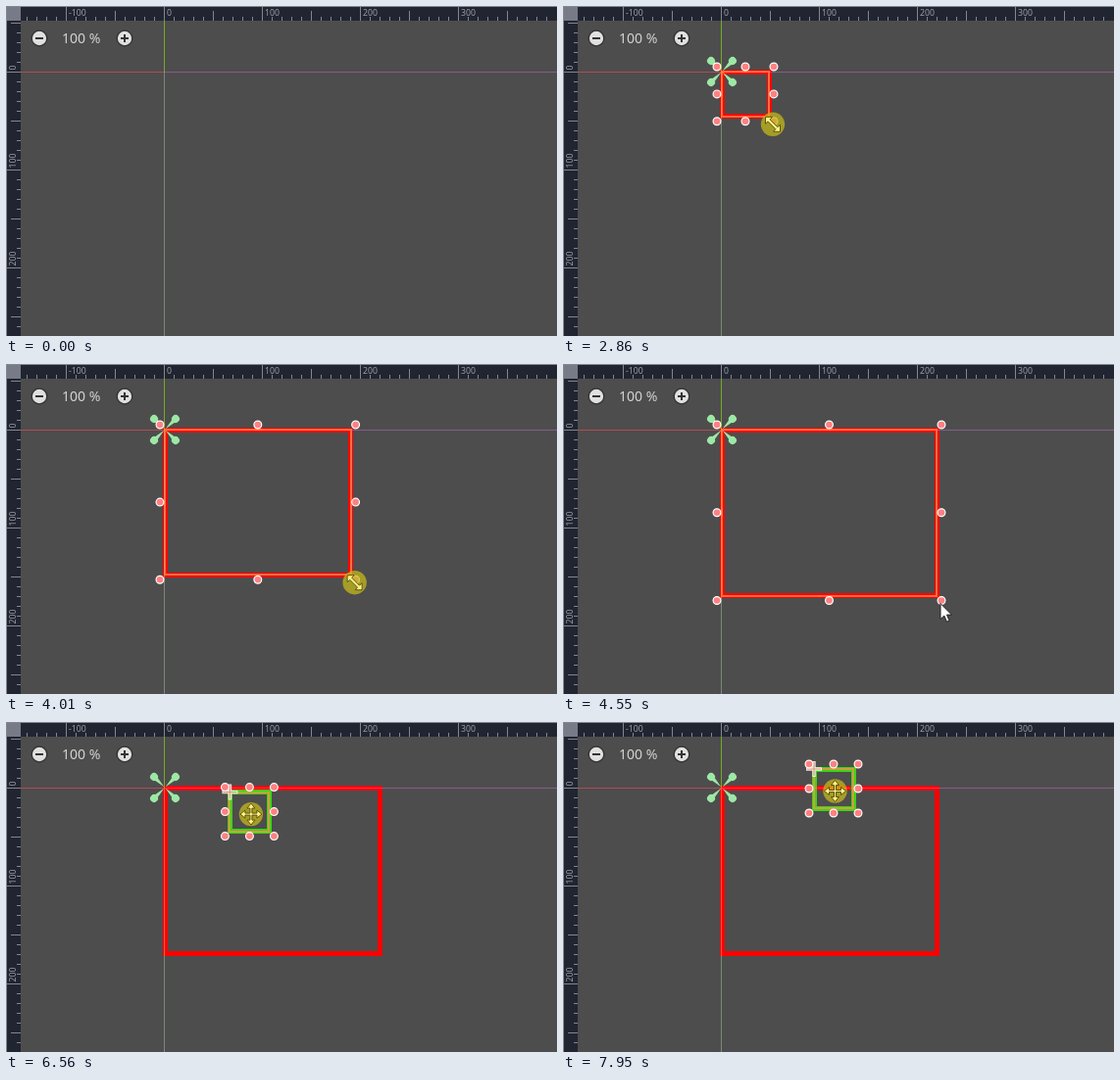
Recreate the animation shown at these times as an HTML page. Size 562 by 337 pixels, loop 8 s.

```html
<!DOCTYPE html>
<html lang="en">
<head>
<meta charset="utf-8">
<title>Canvas editor: resize and move</title>
<style>
  html, body { margin: 0; width: 100%; height: 100%; overflow: hidden; background: #4d4d4d; }
  svg { display: block; width: 562px; height: 337px; }
  text { font-family: "Noto Sans", "Open Sans", sans-serif; }
  .label { font-size: 8.7px; fill: #9a9da6; }
  .tick { stroke: #83868f; fill: none; shape-rendering: crispEdges; }
  .handle { fill: #ff8080; stroke: #fff; stroke-width: 1.2; }
  .edge { fill: none; stroke-width: 5; shape-rendering: crispEdges; }
</style>
</head>
<body>
<svg viewBox="0 0 562 337">
  <rect width="562" height="337" fill="#4d4d4d"/>
  <rect id="red" class="edge" stroke="#f00"/>
  <rect id="green" class="edge" stroke="#3ad614"/>
  <g id="axes">
    <path d="M161.5 15V67" stroke="#7dbb1c" stroke-opacity=".85"/>
    <path d="M161.5 67V337" stroke="#d4ffc4" stroke-opacity=".34"/>
    <path d="M15 67.5H161" stroke="#d94a55" stroke-opacity=".75"/>
    <path d="M161 67.5H562" stroke="#e070e0" stroke-opacity=".4"/>
  </g>
  <rect id="outline" class="edge" stroke="#ff8c52" stroke-opacity=".75" style="stroke-width:2"/>
  <g id="anchors" fill="#9de8a5" transform="translate(162 67)"></g>
  <g id="pivot">
    <path d="M0-8V8M-8 0H8" stroke="#fff" stroke-width="3.4" stroke-opacity=".85"/>
    <path d="M0-7V7M-7 0H7" stroke="#e58f80" stroke-width="1.2"/>
  </g>
  <g id="handles"></g>
  <g id="cursor">
    <circle id="press" r="12.2" fill="#c4b91a" fill-opacity=".74"/>
    <g id="shapes" stroke-linejoin="round">
      <path id="arrow" d="M0 0V16L3.8 12.6L6.5 18.8L9.1 17.6L6.5 11.6H11.5Z"/>
      <path id="resize" d="M-7.5-7.5H-.5L-2.9-4.9L4.9 2.9L7.5.5V7.5H.5L2.9 4.9L-4.9-2.9L-7.5-.5Z"/>
      <path id="move" d="M-1-1V-6H-4L0-11L4-6H1V-1H6V-4L11 0L6 4V1H1V6H4L0 11L-4 6H-1V1H-6V4L-11 0L-6-4V-1Z"/>
    </g>
  </g>
  <g id="rulers">
    <path d="M0 0H562V15H15V337H0Z" fill="#202531"/>
    <rect width="15" height="15" fill="#777a87"/>
    <path class="tick" d="M0 .5H562M.5 0V337"/>
  </g>
  <g id="zoom">
    <text x="57" y="38" font-size="14" fill="#d2d2d2">100 %</text>
  </g>
</svg>
<script>
const $ = id => document.getElementById(id);
const LOOP = 8000, TICK = 1000 / 13, ORIGIN = { x: 162, y: 67 };

function add(parent, tag, attrs, text) {
  const el = document.createElementNS("http://www.w3.org/2000/svg", tag);
  set(el, attrs);
  if (text !== undefined) el.textContent = text;
  parent.append(el);
  return el;
}
function set(el, attrs) {
  for (const key in attrs) el.setAttribute(key, attrs[key]);
}
const place = (el, [x, y]) => set(el, { transform: `translate(${x} ${y})` });
const show = (el, on) => { el.style.display = on ? "" : "none"; };

function buildRulers() {
  const rulers = $("rulers");
  const start = n => n % 100 === 0 ? 0 : n % 50 === 0 ? 5 : 11;
  let ticks = "";
  const label = (n, transform) => {
    if (n % 100 === 0) add(rulers, "text", { class: "label", transform }, n);
  };
  for (let n = -140; n < 400; n += 10) {
    const x = ORIGIN.x + n - .5;
    ticks += `M${x} ${start(n)}V15`;
    label(n, `translate(${x + 2.5} 10)`);
  }
  for (let n = -50; n < 270; n += 10) {
    const y = ORIGIN.y + n + .5;
    ticks += `M${start(n)} ${y}H15`;
    label(n, `translate(10 ${y - 2}) rotate(-90)`);
  }
  add(rulers, "path", { class: "tick", d: ticks });
}

function buildZoom() {
  for (const [x, d] of [[34, "M-4 0H4"], [121, "M-4 0H4M0-4V4"]]) {
    const button = add($("zoom"), "g", { transform: `translate(${x} 33)` });
    add(button, "circle", { r: 7.8, fill: "#e0e0e0", stroke: "#333", "stroke-width": 1.3 });
    add(button, "path", { d, stroke: "#333", "stroke-width": 2 });
  }
}

function buildAnchors() {
  for (let turn = 45; turn < 360; turn += 90) {
    const pin = add($("anchors"), "g", { transform: `rotate(${turn})` });
    add(pin, "path", { d: "M1 0L14-2.2V2.2Z" });
    add(pin, "circle", { cx: 15.5, r: 4 });
  }
}

// Eight handles around a box, as column and row from -1 to 1.
const handles = [];
for (let i = 0; i < 9; i++) {
  if (i === 4) continue;
  const dot = add($("handles"), "circle", { class: "handle", r: 3.9 });
  handles.push([i % 3 - 1, Math.floor(i / 3) - 1, dot]);
}

const progress = (t, start, end) => Math.min(1, Math.max(0, (t - start) / (end - start)));
const easeOut = (f, power) => 1 - (1 - f) ** power;
const mix = (a, b, f) => a + (b - a) * f;

// Size of the first box while its corner is dragged.
function dragSize(t) {
  const f = easeOut(progress(t, 2790, 4390), 1.28);
  return [mix(40, 219, f), mix(40, 169.5, f)];
}

// Offset of the second box: a quick slide right with a small dip, then a lift.
function dragShift(t) {
  const dip = 11 * Math.sin(Math.PI * progress(t, 6150, 6600));
  const lift = 19 * easeOut(progress(t, 7300, 7900), 1.6);
  return [94 * easeOut(progress(t, 6150, 7090), 2.3), dip - lift];
}

function pointer(t) {
  if (t < 2460) {
    const f = easeOut(progress(t, 1080, 1900), 3.4);
    return [mix(525, 206, f), mix(46, 115, f)];
  }
  if (t < 5100) {
    const [w, h] = dragSize(t);
    return [ORIGIN.x + w + 4 + 32 * progress(t, 4540, 4690), ORIGIN.y + h + 8];
  }
  const f = progress(t, 5330, 6020);
  const [dx, dy] = dragShift(t);
  return [mix(428, 183.5, easeOut(f, 3.8)) + dx, mix(169, 89.5, f) + dy];
}

function draw(t) {
  const s = Math.floor(t / TICK) * TICK;
  const second = t >= 5100;
  const selected = t >= 930;
  const [width, height] = dragSize(s);
  const [dx, dy] = dragShift(s);
  const red = { ...ORIGIN, width, height };
  const green = { x: ORIGIN.x + dx, y: ORIGIN.y + dy, width: 40, height: 40 };
  const box = second ? green : red;

  set($("red"), red);
  set($("green"), green);
  set($("outline"), box);
  show($("red"), t >= 400);
  show($("green"), second);
  for (const id of ["outline", "anchors", "handles"]) show($(id), selected);
  for (const [col, row, dot] of handles) {
    set(dot, {
      cx: box.x + box.width / 2 + col * (box.width / 2 + 5),
      cy: box.y + box.height / 2 + row * (box.height / 2 + 5)
    });
  }
  show($("pivot"), second);
  place($("pivot"), [box.x, box.y]);

  const resizing = t >= 2630 && t < 4550;
  const moving = t >= 6170;
  const pressed = (t >= 2460 && t < 4550) || t >= 6020;
  show($("cursor"), t >= 1080 && !(t >= 5100 && t < 5330));
  place($("cursor"), pointer(s));
  show($("press"), pressed);
  show($("arrow"), !resizing && !moving);
  show($("resize"), resizing);
  show($("move"), moving);
  set($("shapes"), pressed ? { fill: "#fff386", stroke: "#5a5210" } : { fill: "#fff", stroke: "#222" });
}

buildRulers();
buildZoom();
buildAnchors();

const began = performance.now();
function frame() {
  draw((performance.now() - began) % LOOP);
  requestAnimationFrame(frame);
}
frame();
</script>
</body>
</html>
```
